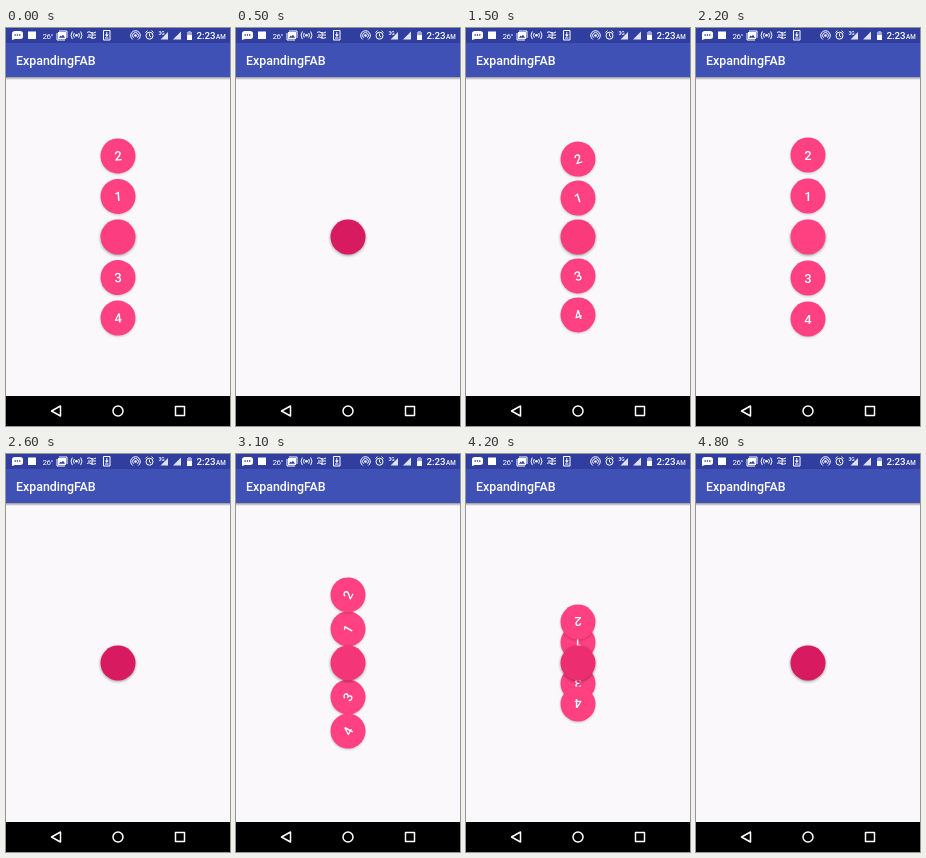
An HTML page for the animation above (4900 ms loop, 224 by 398 pixels).

```html
<!DOCTYPE html>
<html lang="en">
<head>
<meta charset="utf-8">
<title>ExpandingFAB</title>
<style>
  html, body { margin: 0; width: 100%; height: 100%; overflow: hidden; background: #faf8fb; }
  svg { display: block; width: 224px; height: 398px; font-family: Roboto, sans-serif; }
  .line { fill: none; stroke: #fff; }
  .item { filter: drop-shadow(0 1px 1px #0003); }
  .item text { font-size: 13px; font-weight: 500; fill: #fff; text-anchor: middle; }
  #fab { filter: drop-shadow(0 1.5px 1.5px #0006); }
</style>
</head>
<body>
<svg viewBox="0 0 224 398">
  <defs>
    <linearGradient id="shade" x2="0" y2="1">
      <stop stop-color="#000" stop-opacity=".4"/>
      <stop offset="1" stop-color="#000" stop-opacity="0"/>
    </linearGradient>
  </defs>
  <rect width="224" height="398" fill="#faf8fb"/>
  <rect y="49" width="224" height="3" fill="url(#shade)"/>
  <rect width="224" height="49" fill="#3f51b5"/>
  <rect width="224" height="15" fill="#303f9f"/>
  <text x="10" y="37.3" font-size="12.4" font-weight="500" fill="#fff">ExpandingFAB</text>

  <!-- Status bar -->
  <g fill="#fff">
    <path d="M6 5.5Q6 3 9 3h5q3 0 3 2.500v3q0 2.500-3 2.500H9l-3 1z"/>
    <path d="M8.500 7h1.300m1 0h1.300m1 0h1.300" stroke="#303f9f" stroke-width="1.400"/>
    <rect x="22" y="3.500" width="8" height="7.500"/>
    <text x="36.500" y="10.500" font-size="8" letter-spacing="-.5">26°</text>
    <path d="M52 4h8v7h-8zM53 9.800h6l-2-3-1.500 1.700-1-1z" fill-rule="evenodd"/>
    <path class="line" d="M51 5v7h8M53 3h8v7"/>
    <circle cx="70.500" cy="7.300" r="1.300"/>
    <path class="line" d="M68.300 5q-1.500 2.300 0 4.600M66.300 3.500q-2.500 3.800 0 7.600M72.700 5q1.500 2.300 0 4.600M74.700 3.500q2.500 3.800 0 7.600"/>
    <path class="line" d="M81 4.500q2-1.500 4 0t5-.5M82 7h3m1 0h4M81 9.500q2-1.500 4 0t5 0M86 4v7"/>
    <path class="line" d="M97.500 2.500h6.500v9.500h-6.500zM100.800 4v4M99 10h3.500"/>
    <path d="M98.800 6.500h4l-2 2.500z"/>
    <circle cx="129.500" cy="7.500" r="1.300"/>
    <path class="line" d="M127.700 9.700a2.900 2.900 0 1 1 3.600 0M126.800 11.500a4.800 4.800 0 1 1 5.400 0"/>
    <circle class="line" cx="143.500" cy="7.700" r="3.500"/>
    <path class="line" d="M143.500 5.500v2.500l1.600 1M139.500 4.500l2-1.800M147.500 4.500l-2-1.800"/>
    <text x="152.500" y="6.500" font-size="5" font-weight="500">3G</text>
    <path d="M162 4v7.500h-7.500zM175 3.500v8h-8z" opacity=".85"/>
    <path d="M181 4h1.200V3h2.600v1H186v8h-5z" opacity=".55"/>
    <path d="M181 7h5v5h-5z"/>
    <text x="190.500" y="11" font-size="9.700" font-weight="500">2:23</text>
    <text x="210" y="11" font-size="6.300" font-weight="500">AM</text>
  </g>

  <g id="items"></g>
  <circle id="fab" cx="112" cy="209" r="17.500"/>

  <!-- Navigation bar -->
  <rect y="368" width="224" height="30"/>
  <g class="line" stroke-width="1.500" stroke-linejoin="round">
    <path d="M54.500 378v10l-9-5z"/>
    <circle cx="112" cy="383" r="5"/>
    <path d="M169.500 378.500h9v9h-9z"/>
  </g>
</svg>
<script>
  const LOOP = 4900, STEP = 100, DURATION = 300, GAP = 41;
  const DARK = [216, 27, 96], PINK = [255, 64, 129];
  // Each move: start time, 1 to expand or 0 to collapse
  const moves = [[-21, 0], [1243, 1], [2250, 0], [2881, 1], [4050, 0]];
  const slots = { 2: -2, 1: -1, 3: 1, 4: 2 };

  const group = document.getElementById('items');
  const fab = document.getElementById('fab');
  group.innerHTML = Object.keys(slots).map(label =>
    `<g class="item" data-slot="${slots[label]}"><g>
      <circle r="17.5" fill="#ff4081"/><text y="4.6">${label}</text>
    </g></g>`).join('');
  const items = [...group.children];

  const ease = x => (1 - Math.cos(Math.PI * x)) / 2;

  // Linear state: 0 collapsed, 1 expanded
  function progress(time) {
    const [start, expand] = moves.filter(move => move[0] <= time).pop();
    const amount = Math.min(1, (time - start) / DURATION);
    return expand ? amount : 1 - amount;
  }

  function draw(now) {
    const time = Math.floor(now % LOOP / STEP) * STEP;
    const linear = progress(time);
    const open = ease(linear);
    group.style.display = linear > 0 ? '' : 'none';
    for (const item of items) {
      item.setAttribute('transform', `translate(112 ${209 + item.dataset.slot * GAP * open})`);
      item.firstElementChild.setAttribute('transform', `rotate(${360 * open})`);
    }
    fab.setAttribute('fill', `rgb(${DARK.map((c, i) => Math.round(c + (PINK[i] - c) * linear))})`);
  }

  const began = performance.now();
  function tick() {
    draw(performance.now() - began);
    requestAnimationFrame(tick);
  }
  tick();
</script>
</body>
</html>
```
